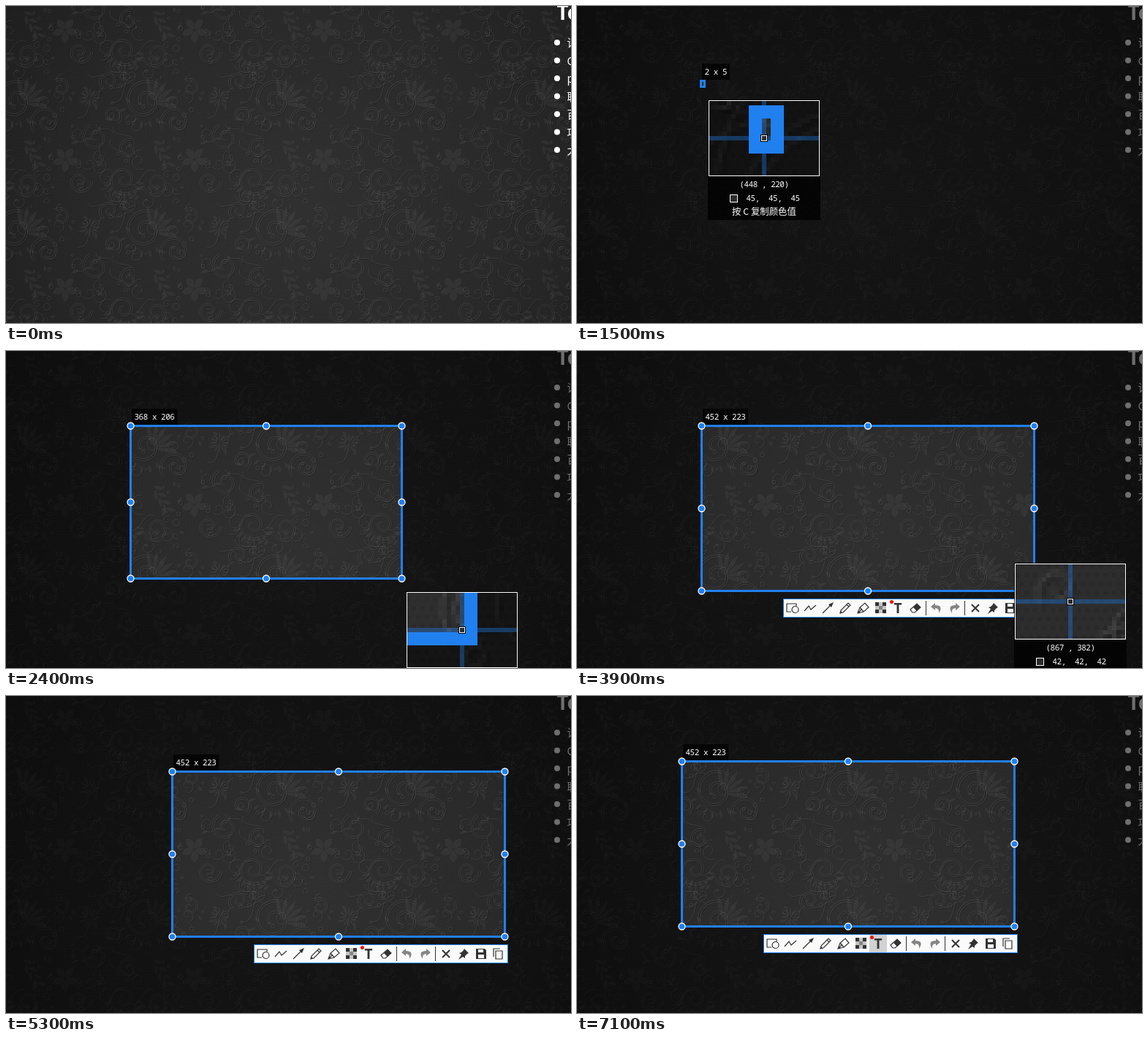
Animation, 773 px wide and 434 px high, one loop 8000 ms. Source, as an HTML page with a canvas:

```html
<!DOCTYPE html>
<html lang="zh">
<head>
<meta charset="utf-8">
<style>
html, body { margin: 0; width: 100%; height: 100%; overflow: hidden; background: #111; }
canvas { display: block; }
</style>
</head>
<body>
<canvas id="stage" width="773" height="434"></canvas>
<script>
const W = 773, H = 434, LOOP = 8000, BLUE = '#2080f0';
const CJK = '"Noto Sans CJK SC", "Noto Sans CJK", sans-serif';
const MONO = '11px "Noto Sans Mono", monospace';
const stage = document.getElementById('stage');
const g = stage.getContext('2d');

function makeCanvas(w, h) {
  const c = document.createElement('canvas');
  c.width = w;
  c.height = h;
  return c;
}

// ---- wallpaper ----
const TILE = 177;

function floralTile() {
  const tile = makeCanvas(TILE, TILE), c = tile.getContext('2d');
  let seed = 7;
  const rnd = () => (seed = seed * 16807 % 2147483647) / 2147483647;
  const rx = () => 178 + rnd() * TILE, ry = () => 90 + rnd() * TILE;
  const vines = new Path2D(), leaves = new Path2D();

  function spiral(x, y, r, start, turns) {
    for (let i = 0; i <= 50; i++) {
      const k = i / 50, a = start + turns * k * 6.283, q = r * (1 - .85 * k);
      vines[i ? 'lineTo' : 'moveTo'](x + q * Math.cos(a), y + q * Math.sin(a));
    }
  }
  // a double-lined curl
  function scroll(x, y, r, start, turns) {
    spiral(x, y, r, start, turns);
    spiral(x, y, r - 3, start, turns * .9);
  }
  function leaf(x, y, len, a, wide) {
    const dx = Math.cos(a) * len, dy = Math.sin(a) * len, k = wide / len;
    leaves.moveTo(x, y);
    leaves.quadraticCurveTo(x + dx * .55 - dy * k, y + dy * .55 + dx * k, x + dx, y + dy);
    leaves.quadraticCurveTo(x + dx * .55 + dy * k, y + dy * .55 - dx * k, x, y);
  }
  function fan(x, y, r, from, step, n, len, wide) {
    for (let i = 0; i < n; i++) {
      const a = from + i * step;
      leaf(x + r * Math.cos(a), y + r * Math.sin(a), len, a, wide);
    }
  }
  function ring(x, y, r) {
    vines.moveTo(x + r, y);
    vines.arc(x, y, r, 0, 7);
  }
  function stem(x, y, dx, dy, bend) {
    vines.moveTo(x, y);
    vines.bezierCurveTo(x + dx * .3 - dy * bend, y + dy * .3 + dx * bend,
      x + dx * .7 + dy * bend, y + dy * .7 - dx * bend, x + dx, y + dy);
  }

  scroll(190, 130, 31, -.4, -1.7);
  fan(200, 133, 4, -1.75, .38, 6, 32, 6);
  fan(190, 130, 27, 1, .35, 6, 11, 4);
  scroll(338, 238, 22, 1, 1.6);
  fan(338, 238, 17, .2, .33, 9, 12, 4);
  fan(292, 126, 2, 0, .524, 12, 12, 2.5);
  fan(258, 210, 1, .3, 1.257, 5, 17, 10);
  for (let i = 0; i < 7; i++) leaf(201 + i * 3, 185 + i * 5, 14, i % 2 ? 1.4 : .3, 5);
  scroll(232, 158, 23, 2.4, 1.5);
  scroll(300, 180, 20, -2, -1.5);
  scroll(278, 240, 18, 0, 1.4);
  scroll(205, 243, 20, 3, -1.4);
  scroll(322, 150, 15, 1, -1.3);
  scroll(252, 112, 14, 4, 1.3);
  scroll(318, 103, 15, 2, 1.4);
  scroll(345, 196, 15, 5, -1.4);
  ring(233, 235, 4.5);
  ring(338, 272, 4.5);
  for (let i = 0; i < 30; i++) ring(rx(), ry(), 1.2 + rnd() * 1.8);
  for (let i = 0; i < 26; i++) leaf(rx(), ry(), 6 + rnd() * 6, rnd() * 6.3, 4);
  for (let i = 0; i < 26; i++) spiral(rx(), ry(), 5 + rnd() * 8, rnd() * 6, rnd() < .5 ? 1.1 : -1.1);
  for (let i = 0; i < 16; i++) stem(rx(), ry(), rnd() * 80 - 40, rnd() * 80 - 40, .4);

  function paint(offset, leafColor, vineColor) {
    for (let x = -3; x < 2; x++) for (let y = -2; y < 2; y++) {
      c.setTransform(1, 0, 0, 1, x * TILE + offset, y * TILE + offset);
      c.fillStyle = leafColor;
      c.fill(leaves);
      c.strokeStyle = vineColor;
      c.stroke(vines);
    }
  }
  paint(1, 'rgba(0,0,0,.05)', 'rgba(0,0,0,.16)');
  paint(0, 'rgba(255,255,255,.05)', 'rgba(255,255,255,.085)');
  return tile;
}

function weave() {
  const tile = makeCanvas(4, 4), c = tile.getContext('2d');
  c.fillStyle = 'rgba(0,0,0,.09)';
  for (let i = 0; i < 4; i++) c.fillRect(i, i * 2 % 4, 1, 1);
  return tile;
}

function makeDesktop() {
  const cv = makeCanvas(W, H), c = cv.getContext('2d');
  const glow = c.createRadialGradient(406, 272, 20, 406, 272, 500);
  glow.addColorStop(0, '#313131');
  glow.addColorStop(.5, '#2b2b2b');
  glow.addColorStop(1, '#1f1f1f');
  for (const fill of [glow, c.createPattern(floralTile(), 'repeat'), c.createPattern(weave(), 'repeat')]) {
    c.fillStyle = fill;
    c.fillRect(0, 0, W, H);
  }
  c.fillStyle = '#fff';
  c.font = 'bold 28px "Noto Sans", sans-serif';
  c.fillText('Todo', 753.5, 19);
  c.font = '15px ' + CJK;
  ['请', 'C', 'p', '职', '百', '项', '大'].forEach((s, i) => {
    const y = 50 + i * 24.5;
    c.beginPath();
    c.arc(754, y, 4, 0, 7);
    c.fill();
    c.fillText(s, 767.5, y + 6);
  });
  return cv;
}
const desktop = makeDesktop();

// ---- motion: [time, x, y] keys, linear between ----
const dragSize = [[1500, 2, 5], [1600, 2, 5], [1700, 12, 12], [1900, 84, 56], [2100, 198, 118],
  [2400, 368, 206], [2500, 412, 214], [2600, 435, 219], [2800, 452, 223]];
const selPos = [[1500, 169.5, 102.5], [1600, 169.5, 102.5], [1700, 170.5, 102.5], [4500, 170.5, 102.5],
  [4600, 149.5, 93.5], [4800, 79.5, 55.5], [4900, 95.5, 44.5], [5000, 140.5, 41.5], [5100, 185.5, 55.5],
  [5200, 215.5, 78.5], [5300, 227.5, 103.5], [5400, 215.5, 120.5], [5500, 190.5, 115.5], [5700, 143.5, 89.5]];
const enterPath = [[800, -20, 250], [900, 130, 250], [1000, 264, 120], [1100, 230, 40], [1200, 170, 103]];
const leavePath = [[3900, 590, 270], [4200, 485, 152]];
const toToolbar = [[5900, 457, 136], [6000, 469, 146], [6100, 470, 170], [6500, 431, 280], [6600, 431, 300]];

function at(keys, t) {
  let i = 0;
  while (i < keys.length - 1 && keys[i + 1][0] <= t) i++;
  const [t0, x0, y0] = keys[i], [t1, x1, y1] = keys[i + 1] || keys[i];
  const k = t1 > t0 ? Math.max(0, (t - t0) / (t1 - t0)) : 0;
  return [x0 + Math.round((x1 - x0) * k), y0 + Math.round((y1 - y0) * k)];
}

function cursorAt(t, s) {
  if (t < 800) return null;
  if (t < 1500) return at(enterPath, t);
  if (t < 3900) return [s.x + 1.5 + Math.max(0, s.w - (s.w < 3 ? 2 : 1)), s.y + .5 + s.h];
  if (t < 4400) return at(leavePath, t);
  return t >= 5900 && t < 6700 ? at(toToolbar, t) : null;
}

// ---- capture interface ----
function text(s, x, y, align = 'left', font = MONO) {
  g.font = font;
  g.letterSpacing = font === MONO ? '-.5px' : '0px';
  g.textAlign = align;
  g.textBaseline = 'middle';
  g.fillStyle = '#fff';
  g.fillText(s, x, y);
  g.letterSpacing = '0px';
}

function box(x, y, w, h, color) {
  g.fillStyle = color;
  g.fillRect(x, y, w, h);
}

function outline(x, y, w, h, color, width = 1) {
  g.strokeStyle = color;
  g.lineWidth = width;
  g.strokeRect(x, y, w, h);
}

function drawSelection(s) {
  box(0, 0, W, H, 'rgba(0,0,0,.57)');
  g.drawImage(desktop, s.x + 1.5, s.y + 1.5, s.w, s.h, s.x + 1.5, s.y + 1.5, s.w, s.h);
  outline(s.x, s.y, s.w + 3, s.h + 3, BLUE, 3);
}

function drawHandles(s) {
  const label = s.w + ' x ' + s.h;
  box(s.x + 1.5, s.y - 23.5, label.length * 6.1 + 7.5, 22, 'rgba(0,0,0,.75)');
  text(label, s.x + 5, s.y - 12);
  if (s.w < 10) return;
  for (let i = 0; i < 9; i++) {
    if (i === 4) continue;
    g.beginPath();
    g.arc(s.x + (i % 3) * (s.w + 3) / 2, s.y + Math.floor(i / 3) * (s.h + 3) / 2, 4.5, 0, 7);
    g.fillStyle = BLUE;
    g.fill();
    g.strokeStyle = '#fff';
    g.lineWidth = 1.3;
    g.stroke();
  }
}

const lens = makeCanvas(25, 17), lensCtx = lens.getContext('2d');
function sampleLens([cx, cy]) {
  lensCtx.fillStyle = '#111';
  lensCtx.fillRect(0, 0, 25, 17);
  lensCtx.drawImage(stage, 12 - cx, 8 - cy);
}

function drawMagnifier([cx, cy]) {
  const x = cx + 9, y = cy + 21, mx = x + 76, my = y + 52;
  const v = 39 + (6 * cx + 3 * cy + 7000) % 7;
  box(x - 1, y - 1, 154, 165, 'rgba(0,0,0,.78)');
  g.imageSmoothingEnabled = false;
  g.drawImage(lens, x + 1, y + 1, 150, 102);
  const cross = 'rgba(32,128,240,.36)';
  box(x + 1, my - 3, 150, 6, cross);
  box(mx - 3, y + 1, 6, 102, cross);
  outline(x + .5, y + .5, 151, 103, '#fff');
  box(mx - 5, my - 5, 10, 10, '#000');
  box(mx - 4, my - 4, 8, 8, '#fff');
  box(mx - 3, my - 3, 6, 6, `rgb(${v},${v},${v})`);
  text(`(${cx + 277} , ${cy + 112})`, mx, y + 116, 'center');
  box(x + 29, y + 129, 11, 11, `rgb(${v},${v},${v})`);
  outline(x + 29.5, y + 129.5, 10, 10, '#fff');
  text([v, v, v].join(',  '), x + 51.5, y + 134.5);
  text('按 C 复制颜色值', mx, y + 152, 'center', '12.4px ' + CJK);
}

const DARK = '#333', GRAY = '#858585';
// [x, stroked path, filled path, colour, line width]
const icons = [
  [12, 'M-1 5H-7V-6H6V-3M9 2A4.5 4.5 0 1 1 0 2A4.5 4.5 0 1 1 9 2Z', ''],
  [37, 'M-8 4L-2-3L1 2L8-4', ''],
  [61, 'M-7 7L4-4', 'M8-8L1-5L5-1Z'],
  [85, 'M-7 7L-6 3L4-7L7-4L-3 6ZM2-5L5-2', 'M-7 7L-6 4L-4 6Z'],
  [109, 'M-7 7L-4-1L3-7L8-1L1 5ZM-4-1L1 5M-7 7L-1 1', 'M-7 7L-6 4L-3 6Z'],
  [181, 'M-7 2L2-6L7-1L-1 6H-4Z', 'M-3-1L2-6L7-1L2 4Z'],
  [210, '', 'M-2-7L-8-2L-2 3V0Q4 0 3 7Q10-4-2-4Z', GRAY],
  [234, '', 'M2-7L8-2L2 3V0Q-4 0-3 7Q-10-4 2-4Z', GRAY],
  [263, 'M-5-5L5 5M5-5L-5 5', '', DARK, 2],
  [287, '', 'M1-7L7-1L5 0L2 3V6L-1 4L-7 8L-3 1L-6-1L-3-2L0-5Z'],
  [311, '', 'M-7-7H5L7-5V7H-7ZM-4-6H3V-2H-4ZM-4 1H4V6H-4Z'],
  [334, 'M-6 4V-7H3M-3-4H6V7H-3Z', '']
].map(([x, line, fill, color = DARK, width = 1.2]) =>
  ({ x, line: new Path2D(line), fill: new Path2D(fill), color, width }));

function drawToolbar(s, textActive) {
  g.save();
  g.translate(s.x + s.w + 3 - 343.5, s.y + s.h + 3 + 10.5);
  box(0, 0, 348, 26, '#fafafa');
  if (textActive) box(145, 1, 24, 24, '#d2d2d2');
  outline(.5, .5, 347, 25, BLUE);
  for (const i of icons) {
    g.save();
    g.translate(i.x, 13);
    g.fillStyle = g.strokeStyle = i.color;
    g.lineWidth = i.width;
    g.stroke(i.line);
    g.fill(i.fill, 'evenodd');
    g.restore();
  }
  for (let i = 0; i < 9; i++)
    box(126 + i % 3 * 5, 5 + Math.floor(i / 3) * 5, 5, 5, i % 2 ? '#c4c4c4' : i === 4 ? GRAY : DARK);
  box(195, 3, 1, 20, DARK);
  box(248, 3, 1, 20, DARK);
  g.font = 'bold 19px "Noto Sans", sans-serif';
  g.textAlign = 'center';
  g.textBaseline = 'alphabetic';
  g.fillStyle = DARK;
  g.fillText('T', 157, 20);
  g.beginPath();
  g.arc(148.5, 4.5, 2.5, 0, 7);
  g.fillStyle = '#f01010';
  g.fill();
  g.restore();
}

function draw(now) {
  const t = Math.floor(now % LOOP / 100) * 100;
  const [x, y] = at(selPos, t), [w, h] = at(dragSize, t);
  const sel = { x, y, w, h }, cursor = cursorAt(t, sel);
  g.drawImage(desktop, 0, 0);
  if (t >= 1500) drawSelection(sel);
  if (cursor) sampleLens(cursor);
  if (t >= 1500) drawHandles(sel);
  if (t >= 3900) drawToolbar(sel, t >= 7100);
  if (cursor) drawMagnifier(cursor);
}

const start = performance.now();
function loop() {
  draw(performance.now() - start);
  requestAnimationFrame(loop);
}
loop();
</script>
</body>
</html>
```
